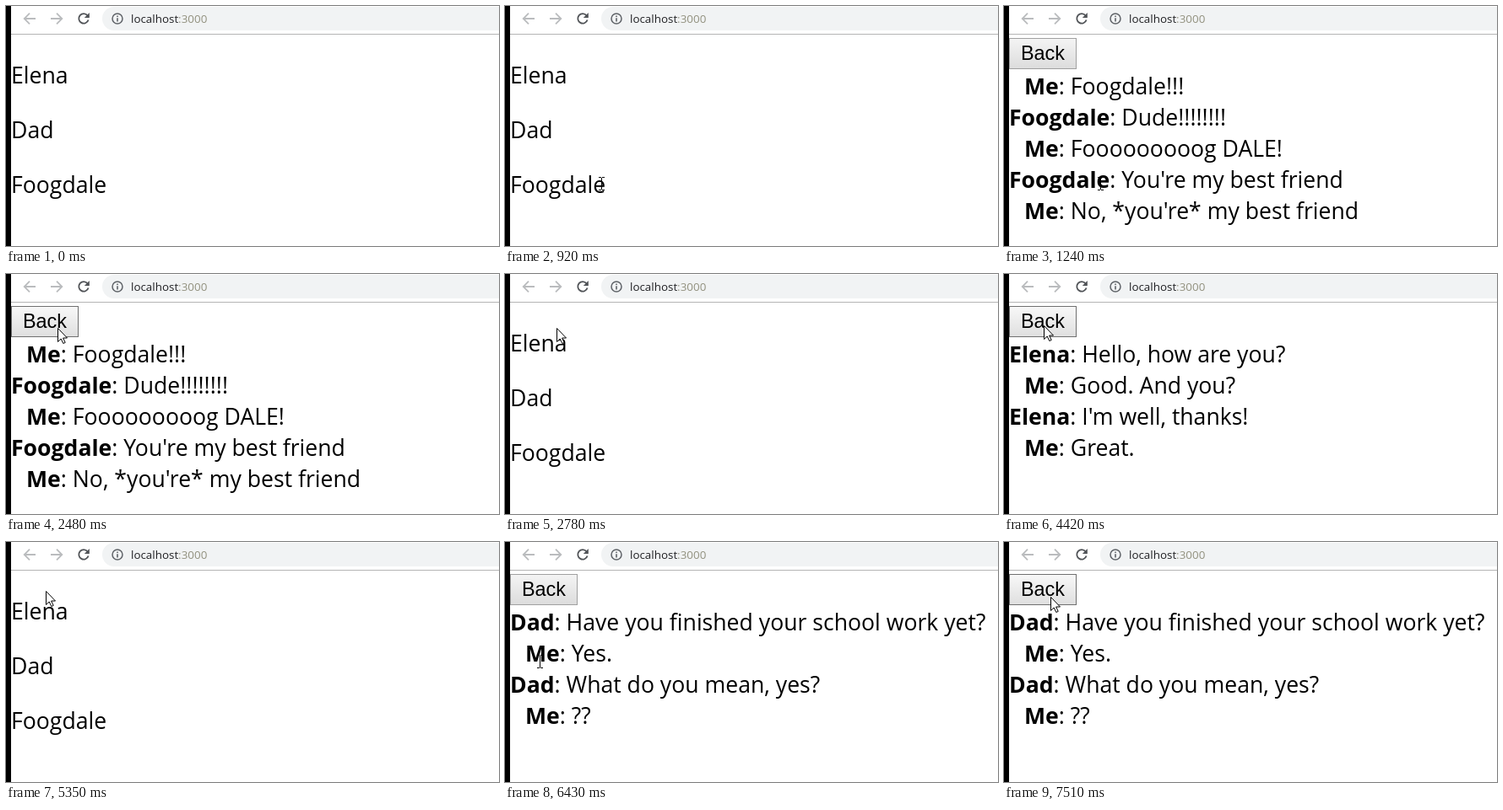
Write an HTML page that moves like this. It is 584 px wide and 285 px high and loops after 7990 ms.

```html
<!DOCTYPE html>
<html lang="en">
<meta charset="utf-8">
<title>Chat demo</title>
<style>
  html, body { margin: 0; height: 100%; overflow: hidden; background: #fff }
  svg { display: block }
  text { font: 26.6px "Open Sans", "Noto Sans", sans-serif }
  .bold { font-weight: 700 }
  .url { font-size: 13.4px; fill: #202124 }
  .label { font: 23.4px "Liberation Sans", Arial, sans-serif }
  .icon { fill: none; stroke-width: 1.8 }
</style>
<svg width="584" height="285" viewBox="0 0 584 285">
  <defs>
    <linearGradient id="face" x2="0" y2="1">
      <stop stop-color="#f4f4f4"/><stop offset="1" stop-color="#dcdcdc"/>
    </linearGradient>
    <linearGradient id="faceHover" x2="0" y2="1">
      <stop stop-color="#f8f8f8"/><stop offset="1" stop-color="#dfdfdf"/>
    </linearGradient>
  </defs>
  <rect width="6" height="285"/>
  <rect x="6" y="33" width="578" height="1" fill="#b4b4b4"/>
  <rect x="114" y="1" width="500" height="28" rx="14" fill="#f1f3f4"/>
  <g class="icon" stroke="#babcbe">
    <path d="M35 15H22M28 8.7L21.7 15L28 21.3"/>
    <path d="M53 15H66M60 8.7L66.3 15L60 21.3"/>
  </g>
  <path class="icon" stroke="#505357" d="M96.6 11.2A5.8 5.8 0 1 0 97.6 16.6"/>
  <path fill="#505357" d="M98.8 8v6h-6z"/>
  <circle class="icon" cx="132" cy="15" r="6" style="stroke-width:1.5" stroke="#5f6368"/>
  <path fill="#5f6368" d="M131.2 11.5h1.6v1.6h-1.6zM131.2 14.2h1.6v4.3h-1.6z"/>
  <text class="url" x="148" y="20">localhost<tspan fill="#92917f">:3000</tspan></text>

  <g id="list"></g>
  <g id="chat">
    <rect id="button" x="6.5" y="38.5" width="79" height="36"/>
    <text class="label" x="20" y="64">Back</text>
    <g id="lines"></g>
  </g>
  <path id="arrow" d="M-.5 .5V16.5L3.2 13L5.8 18.5L8.2 17.4L5.6 12H10.5Z" fill="#fff" stroke="#000"/>
  <path id="beam" d="M-3 -7.5H0M1 -7.5H4M-3 7.5H0M1 7.5H4M.5 -7V7" fill="none" stroke="#000"/>
</svg>
<script>
const $ = id => document.getElementById(id);
const LOOP = 7990, TICK = 76.5;

const chats = {
  Foogdale: ["Foogdale!!!", "Dude!!!!!!!!", "Fooooooooog DALE!", "You're my best friend", "No, *you're* my best friend"],
  Elena: ["Hello, how are you?", "Good. And you?", "I'm well, thanks!", "Great."],
  Dad: ["Have you finished your school work yet?", "Yes.", "What do you mean, yes?", "??"],
};
// Start time and open chat; null shows the contact list.
const views = [[0, null], [1160, "Foogdale"], [2710, null], [3640, "Elena"], [5280, null], [6350, "Dad"]];

// Pointer moves: start, steps, end x and y, optional curve control point.
const moves = [
  [150, 8, 115, 211],
  [920, 1, 114, 211],
  [1620, 7, 68, 88],
  [2320, 3, 62, 64],
  [2950, 8, 48, 71, 56, 134],
  [3720, 4, 48, 84],
  [4180, 6, 48, 58],
  [5580, 8, 41, 142, 64, 100],
  [6810, 5, 55, 72],
  [7270, 4, 56, 65],
];

const viewAt = t => views.findLast(v => v[0] <= t)[1];
const show = (el, on) => el.style.display = on ? "" : "none";

$("list").innerHTML = ["Elena", "Dad", "Foogdale"]
  .map((name, i) => `<text x="6" y="${92 + 65 * i}">${name}</text>`).join("");

const chatLines = name => chats[name].map((line, i) => {
  const mine = name === "Foogdale" ? i % 2 === 0 : i % 2 === 1;
  return `<text x="${mine ? 24 : 6}" y="${105 + 37 * i}"><tspan class="bold">${mine ? "Me" : name}</tspan>: ${line}</text>`;
}).join("");

function pointerAt(t) {
  let x = 552, y = 295, start = -1;
  for (const [from, steps, endX, endY, viaX = (x + endX) / 2, viaY = (y + endY) / 2] of moves) {
    if (t < from) break;
    const p = Math.min(1, (Math.floor((t - from) / TICK) + 1) / steps);
    const e = 1 - (1 - p) ** 2;
    const curve = (a, b, c) => Math.round((1 - e) ** 2 * a + 2 * e * (1 - e) * b + e * e * c);
    x = curve(x, viaX, endX);
    y = curve(y, viaY, endY);
    start = from;
  }
  // The pointer shape only updates while it moves.
  const overText = viewAt(Math.max(0, start)) ? y > 75 : y >= 62 && y < 229 && (y - 62) % 65 < 37;
  return { x, y, overText, visible: start >= 0 };
}

let current;
function draw(now) {
  const t = now % LOOP, view = viewAt(t), { x, y, overText, visible } = pointerAt(t);
  if (view !== current) {
    current = view;
    show($("list"), !view);
    show($("chat"), view);
    $("lines").innerHTML = view ? chatLines(view) : "";
  }
  const hover = x < 86 && y < 75;
  $("button").setAttribute("fill", hover ? "url(#faceHover)" : "url(#face)");
  $("button").setAttribute("stroke", hover ? "#707070" : "#a0a0a0");
  for (const id of ["arrow", "beam"]) {
    show($(id), visible && overText === (id === "beam"));
    $(id).setAttribute("transform", `translate(${x} ${y})`);
  }
  requestAnimationFrame(draw);
}
draw(0);
</script>
</html>
```
